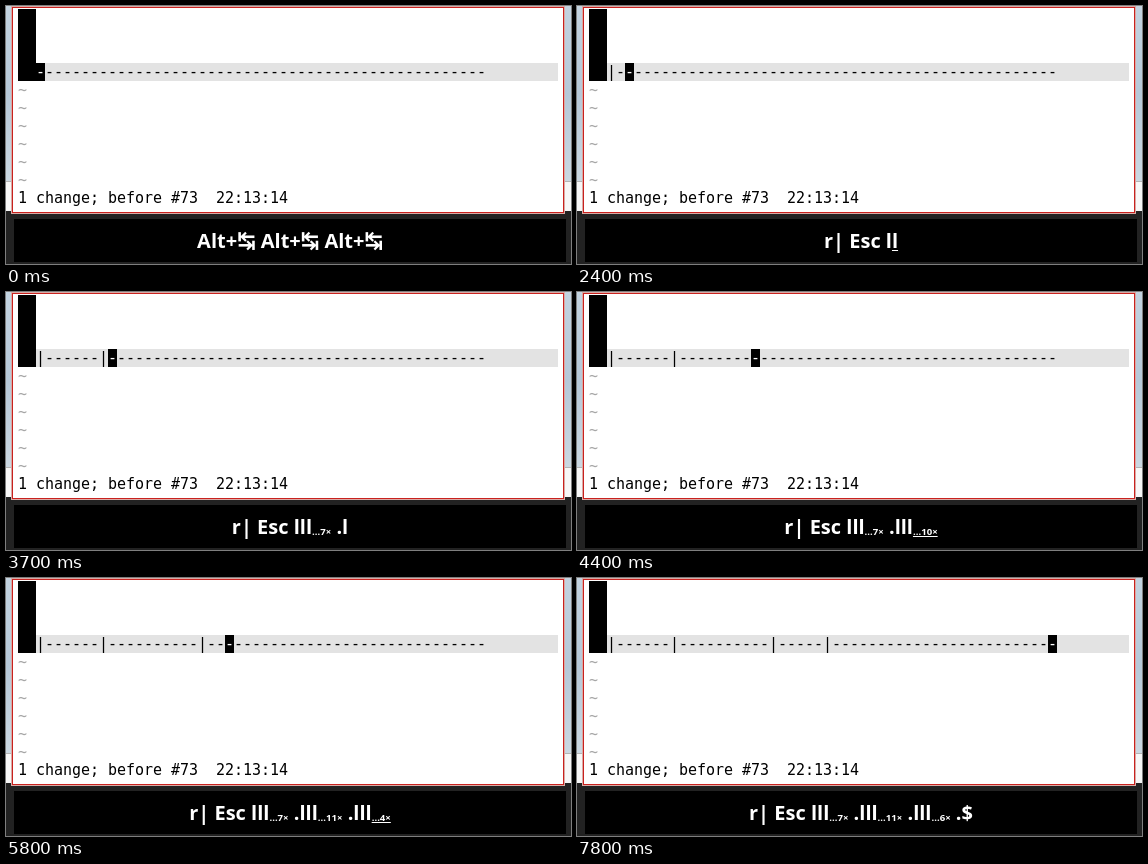
Write an HTML page with a canvas that moves like this. It is 565 px wide and 258 px high and loops after 8 s.

```html
<!DOCTYPE html>
<html lang="en">
<head>
<meta charset="utf-8">
<title>Editor with key display</title>
<style>
html, body { margin: 0; width: 100%; height: 100%; overflow: hidden; background: #222; }
canvas { display: block; }
</style>
</head>
<body>
<canvas id="stage" width="565" height="258"></canvas>
<script>
const ctx = document.getElementById('stage').getContext('2d', { alpha: false });
const LOOP = 8000;
const CELL = 9, ROW = 18, LEFT = 12, TOP = 3;
const MONO = '15px "DejaVu Sans Mono", monospace';
const KEY = 'bold 20px "Noto Sans", "Open Sans", sans-serif';
const SUB = 'bold 9.6px "Noto Sans", "Open Sans", sans-serif';
const TAB = 'bold 22px "DejaVu Sans", sans-serif';

// Pressed keys: "_" starts the underline, "~n" is a small repeat count.
const ESC = 'r| Esc';
const A = ESC + ' lll~7 .';
const B = A + 'lll~11 .';
const C = B + 'lll~6 .';
const keys = [
  [0, 'Alt+↹ Alt+↹ Alt+↹'], [100, ''],
  [400, '_r'], [600, 'r'], [900, 'r_|'], [1100, 'r|'],
  [1500, 'r| _Esc'], [1700, ESC],
  [2000, ESC + ' _l'], [2200, ESC + ' l'], [2400, ESC + ' l_l'],
  [2700, ESC + ' lll_~4'], [2900, ESC + ' lll_~5'], [3100, ESC + ' lll_~7'],
  [3400, ESC + ' lll~7 _.'], [3600, A + '_l'], [3700, A + 'l'],
  [4000, A + 'l_l'], [4100, A + 'lll_~3'], [4200, A + 'lll_~5'],
  [4300, A + 'lll_~8'], [4400, A + 'lll_~10'], [4500, A + 'lll_~11'],
  [4600, A + 'lll~11 _.'], [4800, B + '_l'], [5000, B + 'l'],
  [5200, B + 'l_l'], [5400, B + 'll'],
  [5700, B + 'lll_~3'], [5800, B + 'lll_~4'], [5900, B + 'lll_~5'],
  [6000, B + 'lll_~6'], [6100, B + 'lll~6'],
  [6300, B + 'lll~6 _.'], [6500, C], [7600, C + '_$'], [7800, C + '$']
];
const cursor = [
  [0, 0], [2000, 1], [2400, 2], [2700, 4], [3000, 5], [3100, 6], [3200, 7],
  [3600, 8], [4000, 9], [4100, 10], [4200, 12], [4300, 14], [4400, 16], [4500, 18],
  [4800, 19], [5200, 20], [5700, 21], [5900, 22], [6000, 24], [7600, 49]
];
const bars = [[900, 0], [3500, 7], [4600, 18], [6400, 24]];

function at(track, t) {
  let value;
  for (const [start, v] of track) if (start <= t) value = v;
  return value;
}

function box(x, y, w, h, color) {
  ctx.fillStyle = color;
  ctx.fillRect(x, y, w, h);
}

function mono(text, col, row, color) {
  ctx.font = MONO;
  ctx.fillStyle = color;
  [...text].forEach((c, i) => ctx.fillText(c, LEFT + (col + i) * CELL, TOP + row * ROW + 14));
}

function drawDesktop() {
  const sky = ctx.createLinearGradient(0, 0, 0, 176);
  sky.addColorStop(0, '#c3d3e0');
  sky.addColorStop(0.5, '#b6c8d8');
  sky.addColorStop(1, '#cbd8e2');
  box(0, 0, 565, 258, '#222');
  box(0, 0, 565, 176, sky);
  box(0, 175, 565, 1, '#b4b4b4');
  box(0, 176, 565, 29, '#f7f7f7');
  box(5, 0, 554, 208, '#d9aaa5');
  box(6, 1, 552, 206, '#c9211e');
  box(7, 2, 550, 204, '#fff');
  box(8, 213, 552, 43, '#000');
}

function drawEditor(t) {
  const pos = at(cursor, t);
  const line = Array(50).fill('-');
  for (const [start, col] of bars) if (start <= t) line[col] = '|';

  box(LEFT, TOP, 2 * CELL, 4 * ROW, '#000');
  box(30, 57, 522, ROW, '#e3e3e3');
  mono(line.join(''), 2, 3, '#000');
  box(30 + pos * CELL, 57, CELL, ROW, '#000');
  mono(line[pos], 2 + pos, 3, '#fff');
  for (let row = 4; row < 10; row++) mono('~', 0, row, '#a6a6a6');
  mono('1 change; before #73  22:13:14', 0, 10, '#000');
}

function drawKeys(t) {
  let underlined = false, width = 0;
  const runs = [];
  for (const part of at(keys, t).match(/_|↹|~\d+|[^_↹~]+/g) || []) {
    if (part === '_') { underlined = true; continue; }
    const small = part[0] === '~';
    const run = {
      text: small ? '…' + part.slice(1) + '×' : part,
      font: small ? SUB : part === '↹' ? TAB : KEY,
      y: small ? 243 : 242,
      underlined
    };
    ctx.font = run.font;
    run.w = ctx.measureText(run.text).width;
    width += run.w;
    runs.push(run);
  }
  let x = 284 - width / 2;
  ctx.fillStyle = '#fff';
  for (const run of runs) {
    ctx.font = run.font;
    ctx.fillText(run.text, x, run.y);
    if (run.underlined) ctx.fillRect(x, 244, run.w, 1);
    x += run.w;
  }
}

const began = performance.now();
function draw() {
  const t = (performance.now() - began) % LOOP;
  drawDesktop();
  drawEditor(t);
  drawKeys(t);
  requestAnimationFrame(draw);
}
draw();
</script>
</body>
</html>
```
